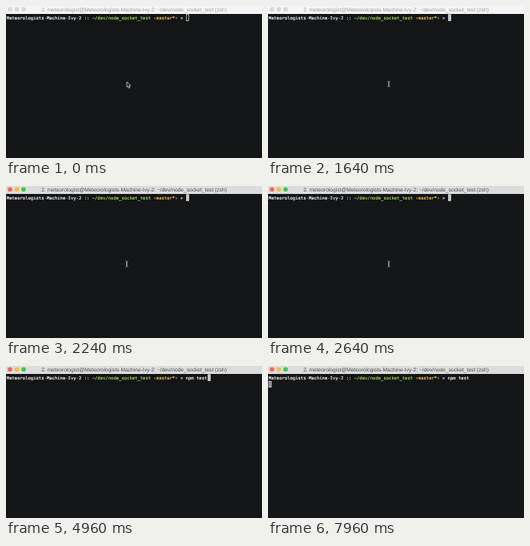
An HTML page for the animation above (8 s loop, 320 px wide and 191 px high).

```html
<!DOCTYPE html>
<html lang="en">
<head>
<meta charset="utf-8">
<title>Terminal</title>
<style>
  html, body { margin: 0; width: 100%; height: 100%; overflow: hidden; background: #131517; }
  svg { display: block; width: 100vw; height: 100vh; }
  text { white-space: pre; text-rendering: geometricPrecision; }
  .title { font: 6.65px "Liberation Sans", Arial, sans-serif; text-anchor: middle; }
  .line { font: 5.565px "DejaVu Sans Mono", Menlo, monospace; stroke-width: .15; }
  .host { fill: #fff; stroke: #fff; }
  .sep { fill: #d3dcec; stroke: #d3dcec; }
  .path { fill: #a9d65c; stroke: #a9d65c; }
  .branch { fill: #f0c45c; stroke: #f0c45c; }
</style>
</head>
<body>
<svg viewBox="0 0 320 191" preserveAspectRatio="none">
  <rect width="320" height="191" fill="#131517"/>
  <rect id="bar" width="320" height="10"/>
  <g id="lights">
    <circle cx="5" cy="4.2" r="2.8"/>
    <circle cx="13.5" cy="4.2" r="2.8"/>
    <circle cx="22" cy="4.2" r="2.8"/>
  </g>
  <text id="title" class="title" x="160" y="6.9">2. meteorologist@Meteorologists-Machine-Ivy-2: ~/dev/node_socket_test (zsh)</text>
  <text class="line" x="0.8" y="16.8"><tspan class="host">Meteorologists-Machine-Ivy-2</tspan><tspan class="sep"> :: </tspan><tspan class="path">~/dev/node_socket_test</tspan><tspan class="branch"> ‹master*›</tspan><tspan class="sep"> » </tspan><tspan class="host" id="command">npm test</tspan></text>
  <rect id="cursor" width="3" height="7.6" stroke="#e4e4e4" stroke-width=".7"/>
  <path id="arrow" d="M151 95.3v6.7l1.6-1.4 1.1 2.5 1.2-.5-1.1-2.5h2.1z" fill="#111" stroke="#eee" stroke-width=".7"/>
  <path id="beam" d="M149.4 94.6q1.6 0 1.6 1.2v4.4q0 1.2-1.6 1.2M152.6 94.6q-1.6 0-1.6 1.2v4.4q0 1.2 1.6 1.2" fill="none" stroke="#c8c8c8" stroke-width=".7"/>
</svg>
<script>
const LOOP = 8000;
const FOCUS = 1600, ACTIVE = 1720, KEY = 3400, RECALL = 3560, ENTER = 7880;
const CELL = 3.35, LEFT = 0.8, PROMPT = 67, COMMAND = 8;
const $ = id => document.getElementById(id);
const set = (el, attrs) => {
  for (const name in attrs) el.setAttribute(name, attrs[name]);
};
const show = (id, on) => set($(id), { visibility: on ? "visible" : "hidden" });
const lights = [...$("lights").children];

function draw(t) {
  const active = t >= ACTIVE;
  set($("bar"), { fill: active ? "#dddcdd" : "#f4f4f4" });
  set($("title"), { fill: active ? "#505050" : "#a0a0a0" });
  ["#f9615a", "#f8bd38", "#39c84a"].forEach((color, i) =>
    set(lights[i], { fill: active ? color : "#d6d6d6" }));

  show("arrow", t < FOCUS);
  show("beam", t >= FOCUS && t < KEY);
  show("command", t >= RECALL);

  const entered = t >= ENTER;
  const column = entered ? 0 : PROMPT + (t >= RECALL ? COMMAND : 0);
  set($("cursor"), {
    x: LEFT + column * CELL + 0.3,
    y: entered ? 19.1 : 10.8,
    fill: t < FOCUS ? "#131517" : entered ? "#858585" : "#c6c6c6"
  });
}

const start = performance.now();
function tick() {
  draw((performance.now() - start) % LOOP);
  requestAnimationFrame(tick);
}
tick();
</script>
</body>
</html>
```
